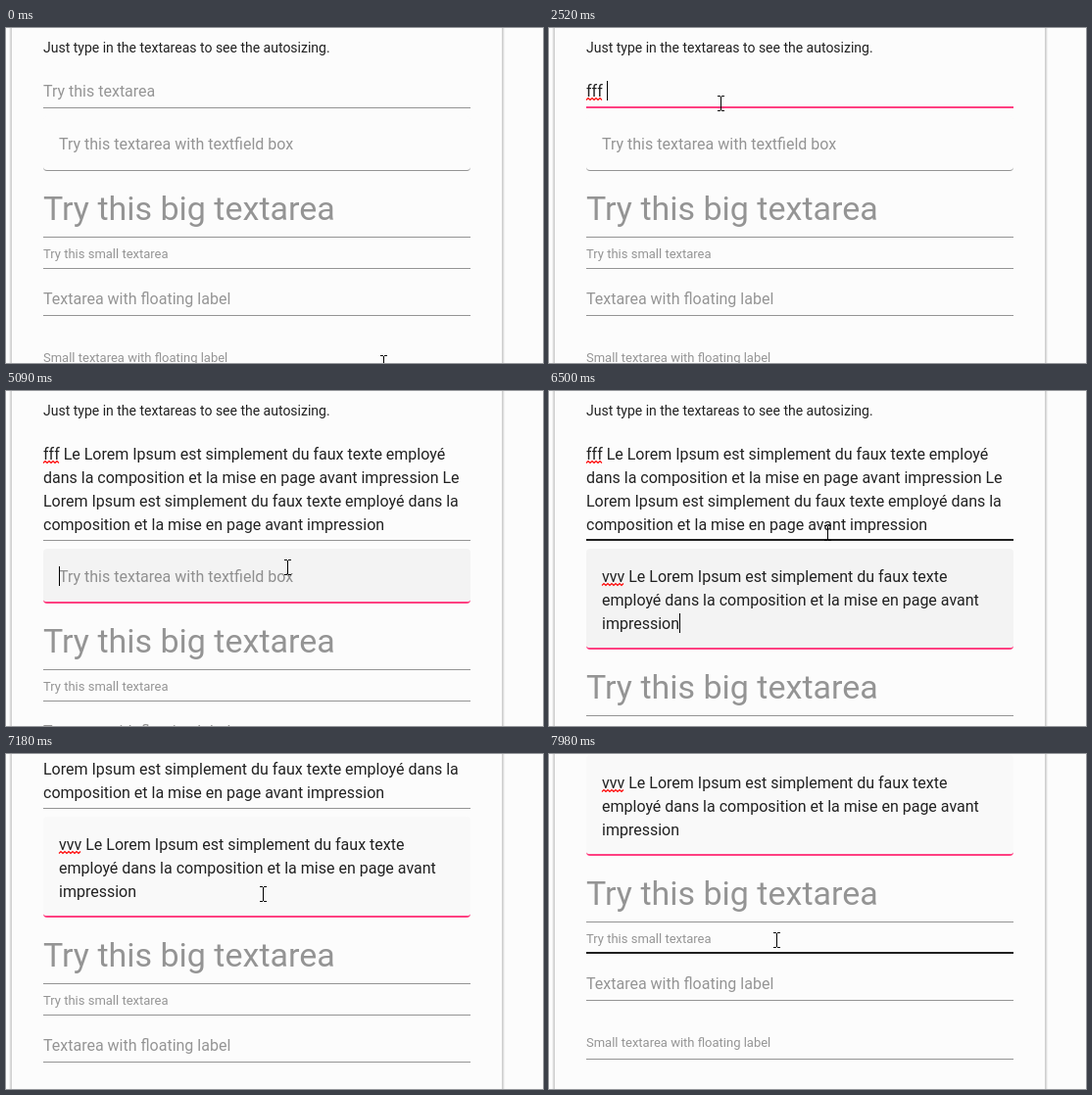
An HTML page with a canvas for the animation above (8 s loop, 548x342 px).

```html
<!DOCTYPE html>
<html lang="en">
<head>
<meta charset="utf-8">
<title>Autosizing textareas</title>
<style>
html, body { margin: 0; width: 100%; height: 100%; overflow: hidden; background: #fcfcfc; }
canvas { display: block; }
</style>
</head>
<body>
<canvas id="stage" width="548" height="342"></canvas>
<script>
const ctx = document.getElementById('stage').getContext('2d');
const LOOP = 8000, STEP = 73, LEFT = 38, RIGHT = 474, ROW = 24;
const PAPER = '#fcfcfc', PINK = '#ff4081', INK = 'rgba(0,0,0,.87)', DIM = 'rgba(0,0,0,.41)', RULE = '#949494';
const PASTE = 'Le Lorem Ipsum est simplement du faux texte employé dans la ' +
  'composition et la mise en page avant impression';

const field = (label, size, base, bottom, box = false) => ({
  label, size, base, bottom, box,
  x: box ? LEFT + 16 : LEFT,
  top: box ? bottom - 56 : base - size - 6
});
const fields = [
  field('Try this textarea', 16, 70, 82),
  field('Try this textarea with textfield box', 16, 124, 146, true),
  field('Try this big textarea', 34, 196, 214),
  field('Try this small textarea', 13, 235, 246),
  field('Textarea with floating label', 16, 282, 294),
  field('Small textarea with floating label', 13, 341, 354)
];

// Everything the user enters; an empty edit only moves the focus
const edits = [];
const edit = (id, time, add) => edits.push({ id, time, add });
const type = (id, start, gap, keys) => [...keys].forEach((key, i) => edit(id, start + i * gap, key));
edit(0, 1000, '');
type(0, 1700, 165, 'fff ');
edit(0, 2750, PASTE);
edit(0, 3740, ' ');
edit(0, 3970, PASTE);
edit(1, 4850, '');
type(1, 5800, 155, 'vvv ');
edit(1, 6420, PASTE);

// Each move runs from the previous pose to its own
const rest = { x: 385, y: 342, scroll: 0 };
const moves = [
  { from: -13, to: 500, x: 162, y: 132, scroll: 0 },
  { from: 567, to: 860, x: 175, y: 77, scroll: 0 },
  { from: 4197, to: 4850, x: 288, y: 199, scroll: 0 },
  { from: 5017, to: 5230, x: 284, y: 145, scroll: 0 },
  { from: 6807, to: 7180, x: 262, y: 143, scroll: 97 },
  { from: 7180, to: 7620, x: 261, y: 145, scroll: 126 },
  { from: 7620, to: 7980, x: 232, y: 190, scroll: 160 }
];

function pose(t) {
  let a = rest;
  for (const b of moves) {
    if (t < b.from) break;
    if (t < b.to) {
      const u = Math.floor((t - b.from) / STEP) * STEP / (b.to - b.from);
      const mix = key => Math.round(a[key] + (b[key] - a[key]) * u);
      return { x: mix('x'), y: mix('y'), scroll: mix('scroll') };
    }
    a = b;
  }
  return a;
}

function setFont(size) {
  ctx.font = size + 'px Roboto, sans-serif';
}

function wrap(str, width) {
  const lines = [''];
  for (const word of str.match(/\S+ ?/g) || []) {
    const line = lines[lines.length - 1] + word;
    if (ctx.measureText(line.trimEnd()).width > width) lines.push(word);
    else lines[lines.length - 1] = line;
  }
  return lines;
}

function rect(x, y, w, h, color) {
  ctx.fillStyle = color;
  ctx.fillRect(x, y, w, h);
}

function text(str, x, y, size, color) {
  setFont(size);
  ctx.fillStyle = color;
  ctx.fillText(str, x, y);
}

function squiggle(x, y, w) {
  ctx.beginPath();
  for (let i = 0; i <= w; i += 2) ctx.lineTo(x + i, y + (i % 4 ? 0.5 : 2.5));
  ctx.strokeStyle = '#f00';
  ctx.lineWidth = 1.1;
  ctx.stroke();
}

function roundBox(y, h, radii, color) {
  ctx.fillStyle = color;
  ctx.beginPath();
  ctx.roundRect(LEFT, y, RIGHT - LEFT, h, radii);
  ctx.fill();
}

function boxShape(top, bottom, weight, color, tint) {
  const inner = { x: 4, y: 4 - weight }, radii = [4, 4, inner, inner];
  roundBox(bottom - 4, 4, [0, 0, 4, 4], color);
  roundBox(top, bottom - top - weight, radii, PAPER);
  roundBox(top, bottom - top - weight, radii, `rgba(0,0,0,${tint})`);
}

function beam(x, y) {
  rect(x, y - 7, 1, 14, '#000');
  for (const row of [y - 8, y + 7]) {
    rect(x - 3, row, 3, 1, '#000');
    rect(x + 1, row, 3, 1, '#000');
  }
}

function card() {
  rect(0, 0, 548, 342, PAPER);
  ['#d0d0d0', '#dcdcdc', '#f2f2f2'].forEach((shade, i) => {
    rect(5 - i, 0, 1, 342, shade);
    rect(506 + i, 0, 1, 342, shade);
  });
}

// The caret blinks anew after every edit
function caretShown(since) {
  return since < 380 || (since - 380) % 1080 >= 540;
}

function draw(t) {
  const { x, y, scroll } = pose(t);
  const done = edits.filter(e => e.time <= t);
  const last = done[done.length - 1];

  card();
  text('Just type in the textareas to see the autosizing.', LEFT, 25 - scroll, 14, INK);

  let shift = -scroll;
  fields.forEach((f, id) => {
    setFont(f.size);
    const value = done.filter(e => e.id === id).map(e => e.add).join('');
    const lines = wrap(value, RIGHT + LEFT - 2 * f.x);
    const grow = lines.length > 1 ? (lines.length - 1) * ROW - 1 : 0;
    const top = f.top + shift, bottom = f.bottom + shift + grow, base = f.base + shift;
    const focused = Boolean(last) && last.id === id;
    const hover = y >= top && y < bottom;
    const weight = focused || hover ? 2 : 1;
    const color = focused ? PINK : hover ? '#202020' : RULE;

    if (f.box) {
      const tint = focused && !scroll ? 0.036 : shift ? 0.012 : 0;
      boxShape(top, bottom, weight, color, tint);
    } else {
      rect(LEFT, bottom - weight, RIGHT - LEFT, weight, color);
    }

    if (!value) text(f.label, f.x, base, f.size, DIM);
    lines.forEach((line, n) => text(line, f.x, base + n * ROW, f.size, INK));
    if (value.length > 3) squiggle(f.x, base + 1, ctx.measureText(value.slice(0, 3)).width);
    if (focused && caretShown(t - last.time)) {
      const n = lines.length - 1;
      rect(Math.round(f.x + ctx.measureText(lines[n]).width), base - 16 + n * ROW, 1, 20, '#000');
    }
    shift += grow;
  });

  beam(x, y);
}

const begin = performance.now();
function frame() {
  draw((performance.now() - begin) % LOOP);
  requestAnimationFrame(frame);
}
frame();
</script>
</body>
</html>
```
